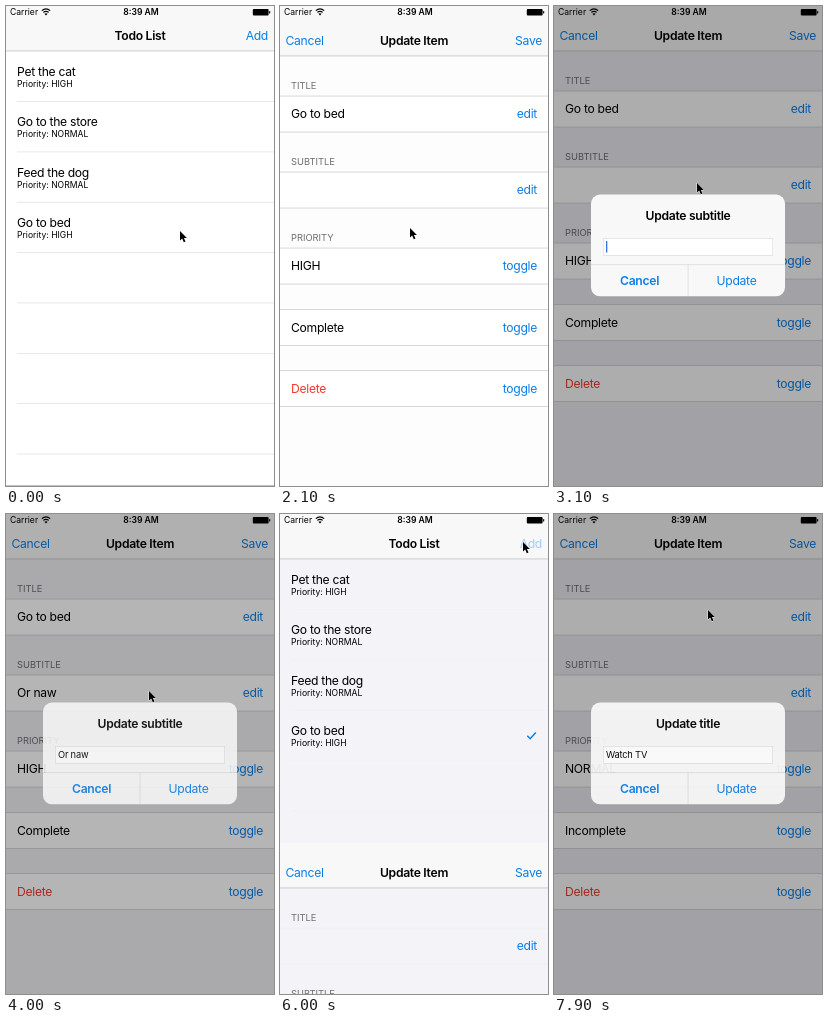
An HTML page for the animation above (8 s loop, 268 by 480 pixels).

```html
<!DOCTYPE html>
<html lang="en">
<head>
<meta charset="utf-8">
<title>Todo list</title>
<style>
  html, body { margin: 0; width: 100%; height: 100%; overflow: hidden; background: #fff; }
  svg { display: block; width: 100%; height: 100%; }
  text { font-family: Inter, Roboto, sans-serif; white-space: pre; fill: #000; }
  .body { font-size: 12.17px; letter-spacing: -.3px; }
  .bold { font-size: 12.17px; letter-spacing: -.3px; font-weight: 600; }
  .small { font-size: 8.6px; }
  .time { font-size: 8.6px; font-weight: 600; }
  .head { font-size: 9.3px; fill: #6d6d72; }
  .input { font-size: 9.3px; letter-spacing: -.2px; }
  .blue { fill: #0b7ee6; }
  .red { fill: #f0392d; }
  .paper { fill: #fff; }
  .ground { fill: #efeff4; }
  .bright .ground { fill: #fdfdfe; }
  .flat .paper, .flat .ground { fill: #f3f3f8; }
  .flat .rule { opacity: .15; }
</style>
</head>
<body>
<svg id="stage" viewBox="0 0 268 480" preserveAspectRatio="none"></svg>
<script>
const LOOP = 8000, STEP = 100;
const stage = document.getElementById('stage');

function el(parent, tag, attrs = {}) {
  const node = document.createElementNS('http://www.w3.org/2000/svg', tag);
  for (const key in attrs) node.setAttribute(key, attrs[key]);
  return parent.appendChild(node);
}
const group = parent => el(parent, 'g');
const rect = (parent, x, y, width, height, fill, rx = 0) =>
  el(parent, 'rect', { x, y, width, height, fill, rx });
const area = (parent, y, height, cls) =>
  el(parent, 'rect', { x: 0, y, width: 268, height, class: cls });
const line = (parent, x, y, width, fill) => rect(parent, x, y, width, .7, fill);
function rule(parent, x, y, fill = '#c8c7cc') {
  line(parent, x, y, 268 - x, fill).setAttribute('class', 'rule');
}
function text(parent, x, y, cls, str, anchor = 'start') {
  const node = el(parent, 'text', { x, y, class: cls, 'text-anchor': anchor });
  node.textContent = str;
  return node;
}

function navBar(parent, title, left, right) {
  rect(parent, 0, 0, 268, 45, '#f8f8f8');
  line(parent, 0, 44.6, 268, '#b9b9bb');
  text(parent, 134, 33.7, 'bold', title, 'middle');
  text(parent, 5.5, 33.7, 'body blue', left);
  return text(parent, 262, 33.7, 'body blue', right, 'end');
}

// Todo list
const screens = group(stage);
const list = group(screens);
area(list, 0, 480, 'paper');
const addButton = navBar(list, 'Todo List', '', 'Add');
[['Pet the cat', 'HIGH'], ['Go to the store', 'NORMAL'],
 ['Feed the dog', 'NORMAL'], ['Go to bed', 'HIGH']].forEach(([name, priority], i) => {
  text(list, 11, 69.8 + i * 50.35, 'body', name);
  text(list, 11, 81 + i * 50.35, 'small', 'Priority: ' + priority);
});
for (let i = 0; i < 8; i++) rule(list, 11, 95.2 + i * 50.35, '#dddde0');
line(list, 0, 479, 268, '#a8a8aa');
const check = el(list, 'path', {
  d: 'M247.3 221.8l2.9 2.9 5.6-6.2', fill: 'none', stroke: '#0b7ee6', 'stroke-width': 1.5
});

// Popup above the pressed row
const menu = group(screens);
rect(menu, 133, 197, 77, 22, '#1f1f1f', 5);
el(menu, 'path', { d: 'M166 219h12l-6 6z', fill: '#1f1f1f' });
text(menu, 171.5, 212.2, 'body', 'Complete', 'middle').style.fill = '#fff';

// Item form
const form = group(screens);
area(form, 0, 480, 'ground');
const saveButton = navBar(form, 'Update Item', 'Cancel', 'Save');
function formRow(y, action, cls = 'body') {
  area(form, y, 36, 'paper');
  rule(form, 0, y - .3);
  rule(form, 0, y + 35.7);
  text(form, 257, y + 22.3, 'body blue', action, 'end');
  return text(form, 11, y + 22.3, cls, '');
}
['TITLE', 'SUBTITLE', 'PRIORITY'].forEach((name, i) => text(form, 11, 78.2 + i * 76, 'head', name));
const cells = [
  formRow(85, 'edit'), formRow(161, 'edit'), formRow(237, 'toggle'),
  formRow(298.4, 'toggle'), formRow(359.6, 'toggle', 'body red')
];

// Status bar
text(stage, 4, 9.4, 'small', 'Carrier');
text(stage, 135, 9.4, 'time', '8:39 AM', 'middle');
el(stage, 'path', {
  d: 'M35.8 4.6q4.2-3.6 8.4 0M37.3 6.4q2.7-2.2 5.4 0', fill: 'none', stroke: '#000', 'stroke-width': 1.2
});
el(stage, 'path', { d: 'M38.4 7.7q1.6-1.1 3.2 0L40 9.4z' });
rect(stage, 246.8, 3, 15.8, 6.4, '#000', 1);
rect(stage, 263.1, 5, 1.1, 2.4, '#000', .5);

// Prompt
const dim = rect(stage, 0, 0, 268, 480, '#000');
const prompt = group(stage);
rect(prompt, 37, 188.5, 194, 101.8, '#f8f8f8', 9);
const promptTitle = text(prompt, 134, 214.4, 'bold', '', 'middle');
rect(prompt, 49, 232, 170, 17.5, '#d2d2d4');
rect(prompt, 49.5, 232.5, 169, 16.5, '#fff');
const input = text(prompt, 52, 244.2, 'input', '');
const caret = rect(prompt, 52, 235, 1.3, 11.5, '#3a6fe0');
line(prompt, 37, 258.4, 194, '#d6d6d9');
rect(prompt, 133.7, 258.4, .7, 31.9, '#d6d6d9');
text(prompt, 85.5, 279.3, 'bold blue', 'Cancel', 'middle');
text(prompt, 182.5, 279.3, 'body blue', 'Update', 'middle');

const cursor = el(stage, 'path', {
  d: 'M0 0v9.6l2.2-2 1.6 3.7 1.7-.7-1.6-3.6h3z',
  fill: '#000', stroke: '#fff', 'stroke-width': .8, 'paint-order': 'stroke'
});

// Rows of [time, value, ...], linear in between
function at(table, t, col = 1) {
  const next = table.findIndex(row => row[0] > t);
  if (next === 0) return table[0][col];
  if (next < 0) return table[table.length - 1][col];
  const a = table[next - 1], b = table[next];
  return a[col] + (b[col] - a[col]) * (t - a[0]) / (b[0] - a[0]);
}

const SLIDE = [[0, 480], [45, 425], [90, 329], [140, 205], [190, 88], [240, 28], [290, 5], [340, 0]];
const PATH = [
  [0, 174, 225], [400, 174, 225], [600, 173, 231], [1050, 173, 231], [1250, 171, 212],
  [1400, 171, 212], [1650, 130, 222], [2350, 130, 222], [2650, 143, 177], [4000, 143, 177],
  [4180, 202, 80], [4380, 240, 31], [5300, 240, 31], [5600, 243, 28], [6150, 243, 28],
  [6400, 154, 96]
];
const ITEMS = [
  ['Go to bed', '', 'HIGH', 'Complete', 'Delete'],
  ['', '', 'NORMAL', 'Incomplete', 'Delete']
];
const PROMPTS = [
  { title: 'Update subtitle', open: 2900, close: 3900, typed: 'Or naw',
    keys: [3250, 3330, 3420, 3520, 3600, 3690] },
  { title: 'Update title', open: 6450, close: 7830, typed: 'Watch TV',
    keys: [6750, 6820, 6880, 6940, 6990, 7060, 7300, 7420] }
];
const show = (node, on) => node.setAttribute('visibility', on ? 'visible' : 'hidden');

function formOffset(t) {
  if (t < 4510) return at(SLIDE, t - 1810);
  if (t < 5400) return 480 - at(SLIDE, t - 4510);
  return at(SLIDE, t - 5910);
}

function screenTone(t) {
  if (t < 2900) return 'bright';
  return t >= 4500 && t < 6450 ? 'flat' : '';
}

function drawPrompt(t) {
  const p = PROMPTS[t < 5400 ? 0 : 1];
  const fadeIn = Math.min(1, Math.max(0, (t - p.open) / 250));
  const fadeOut = Math.min(1, Math.max(0, (t - p.close) / 270));
  const on = fadeIn > 0 && fadeOut < 1;
  show(dim, on);
  show(prompt, on);
  show(caret, false);
  if (!on) return;

  dim.setAttribute('opacity', .4 * fadeIn * (1 - fadeOut * .75));
  prompt.setAttribute('opacity', Math.min(1, fadeIn * 1.25) * (1 - fadeOut ** 2));
  const scale = 1 + .16 * Math.max(0, 1 - fadeIn * 1.3) ** 2;
  prompt.setAttribute('transform', `translate(134 239) scale(${scale}) translate(-134 -239)`);
  promptTitle.textContent = p.title;

  input.textContent = p.typed.slice(0, p.keys.filter(k => k <= t).length);
  caret.setAttribute('x', 52 + (input.textContent ? input.getComputedTextLength() : 0));
  const lastKey = Math.max(p.open, ...p.keys.filter(k => k <= t));
  show(caret, t < p.close && (t - lastKey) % 1000 < 550);
}

function draw(t) {
  const offset = formOffset(t);
  screens.setAttribute('class', screenTone(t));
  show(form, offset < 480);
  form.setAttribute('transform', `translate(0 ${offset})`);
  const item = ITEMS[t < 5400 ? 0 : 1];
  cells.forEach((cell, i) => cell.textContent = item[i]);
  if (t >= 3900 && t < 5400) cells[1].textContent = 'Or naw';

  show(check, t >= 1400);
  show(menu, t >= 700 && t < 1400);
  saveButton.setAttribute('opacity', t >= 4400 && t < 5400 ? .35 : 1);
  addButton.setAttribute('opacity', t >= 5800 && t < 6300 ? .35 : 1);
  drawPrompt(t);
  cursor.setAttribute('transform', `translate(${at(PATH, t)} ${at(PATH, t, 2)})`);
}

const start = performance.now();
function tick() {
  const now = performance.now() - start + 5;
  draw(Math.floor(now / STEP) * STEP % LOOP);
  requestAnimationFrame(tick);
}
tick();
</script>
</body>
</html>
```
